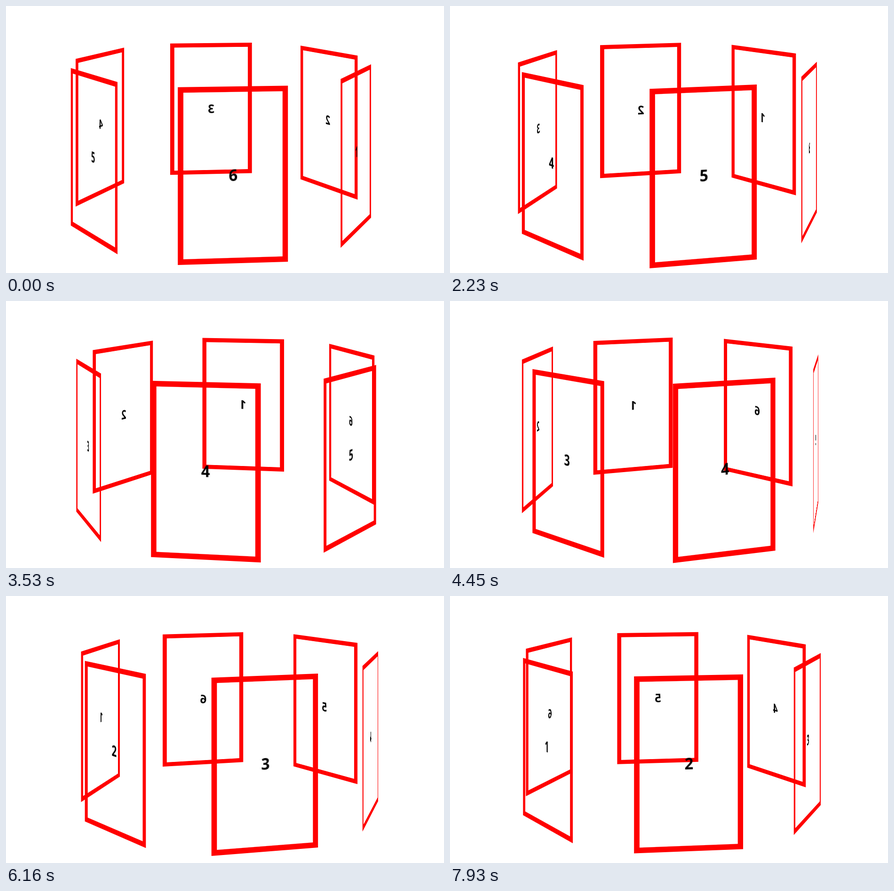
Animation of 931x568 px, one loop 8 s. Source, as an HTML page:

```html
<!DOCTYPE html>
<html lang="en">
<head>
<meta charset="utf-8">
<title>Carousel</title>
<style>
  html, body { margin: 0; width: 100%; height: 100%; overflow: hidden; background: #fff; }
  #scene {
    position: relative; width: 931px; height: 568px; overflow: hidden;
    perspective: 2000px; perspective-origin: 466px -183px;
  }
  #ring {
    position: absolute; left: 466px; top: 277.5px; width: 0; height: 0;
    transform-style: preserve-3d;
  }
  /* Panels sit 10px left of the axis, so the ring wobbles as it turns. */
  .panel {
    position: absolute; left: -110px; top: -160px; width: 200px; height: 320px;
    box-sizing: border-box; border: 10px solid #f00;
    display: flex; align-items: center; justify-content: center;
    font: bold 28px "Open Sans", "Noto Sans", sans-serif; color: #000;
  }
</style>
</head>
<body>
<div id="scene"><div id="ring"></div></div>
<script>
  const PANELS = 6, RADIUS = 300;
  const FPS = 13, STEPS = 104, START_ANGLE = 4.65, STEP_ANGLE = 2.344;
  const ring = document.getElementById('ring');

  for (let i = 1; i <= PANELS; i++) {
    const panel = document.createElement('div');
    panel.className = 'panel';
    panel.textContent = i;
    panel.style.transform = `rotateY(${i * 360 / PANELS}deg) translateZ(${RADIUS}px)`;
    ring.append(panel);
  }

  function draw(time) {
    // 9 ms lead: steps fall on hundredths of a second, rounded down.
    const step = Math.floor((time + 9) * FPS / 1000) % STEPS;
    ring.style.transform = `rotateY(${START_ANGLE + step * STEP_ANGLE}deg)`;
  }

  let start;
  function tick(now) {
    start ??= now;
    draw(now - start);
    requestAnimationFrame(tick);
  }
  draw(0);
  requestAnimationFrame(tick);
</script>
</body>
</html>
```
